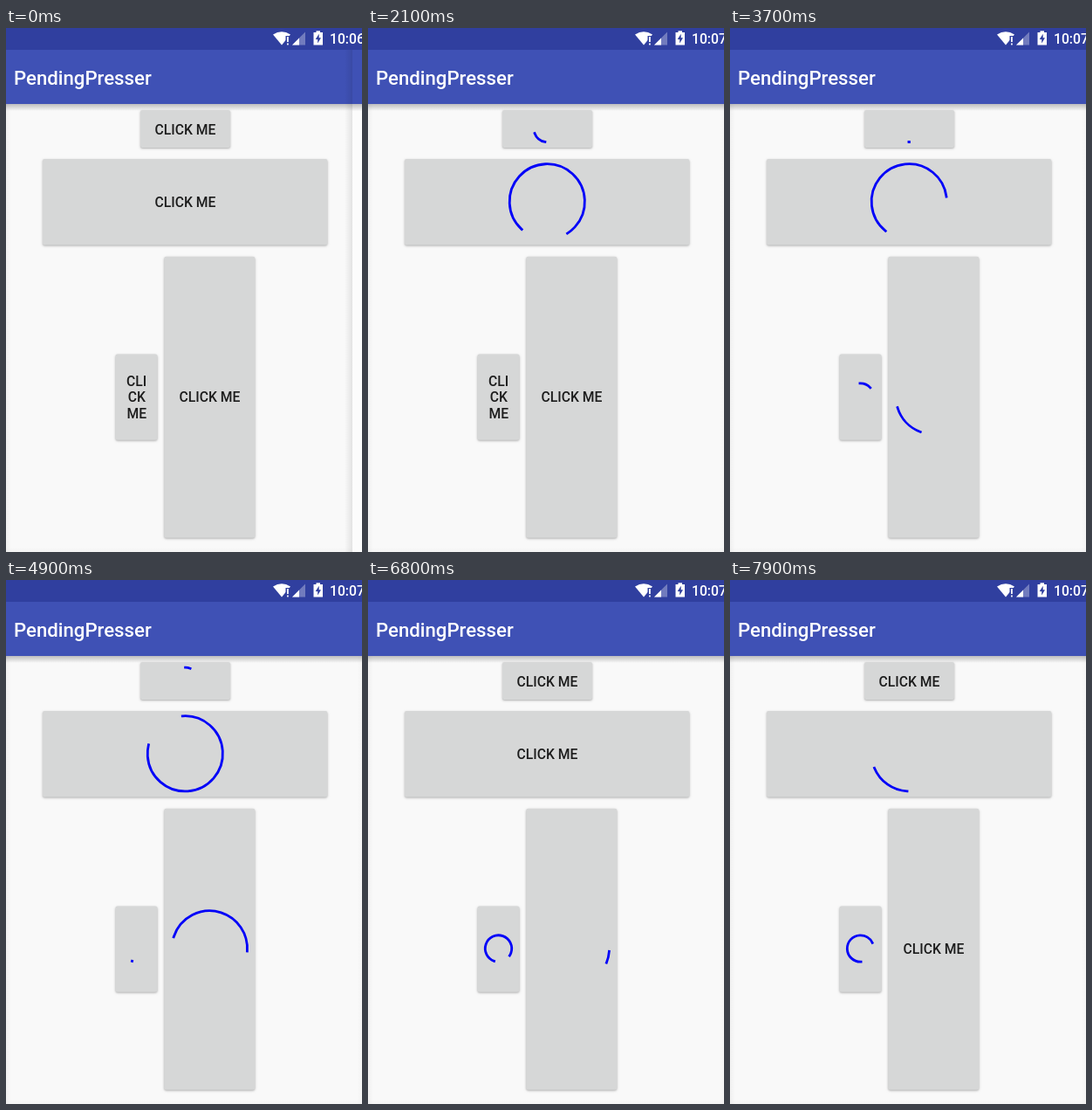
Animation of 408x600 px, one loop 8 s. Source, as an HTML page with a canvas:

```html
<!DOCTYPE html>
<html lang="en">
<head>
<meta charset="utf-8">
<title>Loading buttons</title>
<style>
  html, body { margin: 0; width: 100%; height: 100%; overflow: hidden; background: #f9f9f9; }
  canvas { display: block; width: 408px; height: 600px; }
</style>
</head>
<body>
<canvas id="stage" width="408" height="600"></canvas>
<script>
const ctx = document.getElementById('stage').getContext('2d');
const W = 408, H = 600;
const LOOP = 8000, STEP = 100;
const CYCLE = 1345, RUN = 5000;
const PRESS_LEAD = 80, PRESS_LIFE = 400;
const MAX_ARC = 288, TURN = 306;
const STROKE = 2.8;

const buttons = [
  { x: 154, y: 94, w: 103, h: 43, cx: 205.3, cy: 115.3, r: 15.2,
    lines: ['CLICK ME'], baseline: 121.5, starts: [1083] },
  { x: 42, y: 150, w: 326.3, h: 98.5, cx: 205.3, cy: 198.8, r: 43.1,
    lines: ['CLICK ME'], baseline: 205, starts: [1518, 6891] },
  { x: 125.5, y: 373.5, w: 48, h: 98.3, cx: 149.5, cy: 422, r: 15.2,
    lines: ['CLI', 'CK', 'ME'], baseline: 410, starts: [2206, 7514] },
  { x: 181.3, y: 261.7, w: 104, h: 322, cx: 233.3, cy: 422, r: 43.2,
    lines: ['CLICK ME'], baseline: 428, starts: [2667], touch: [8, -24] }
];

// cubic-bezier(0.4, 0, 0.2, 1)
function ease(x) {
  if (x <= 0) return 0;
  if (x >= 1) return 1;
  let lo = 0, hi = 1;
  for (let i = 0; i < 24; i++) {
    const u = (lo + hi) / 2, v = 1 - u;
    if (1.2 * u * v * v + 0.6 * u * u * v + u * u * u < x) lo = u; else hi = u;
  }
  return lo * lo * (3 - 2 * lo);
}

function fillRect(color, x, y, w, h) {
  ctx.fillStyle = color;
  ctx.fillRect(x, y, w, h);
}

function polygon(color, ...points) {
  ctx.beginPath();
  points.forEach(([x, y]) => ctx.lineTo(x, y));
  ctx.closePath();
  ctx.fillStyle = color;
  ctx.fill();
}

function label(text, x, y, size, color, align = 'left') {
  ctx.font = `500 ${size}px Roboto, sans-serif`;
  ctx.textAlign = align;
  ctx.fillStyle = color;
  ctx.fillText(text, x, y);
}

function shade(x0, y0, x1, y1, from, to, box) {
  const g = ctx.createLinearGradient(x0, y0, x1, y1);
  g.addColorStop(0, `rgba(0,0,0,${from})`);
  g.addColorStop(1, `rgba(0,0,0,${to})`);
  fillRect(g, ...box);
}

function roundRect({ x, y, w, h }) {
  ctx.beginPath();
  ctx.roundRect(x, y, w, h, 2.2);
}

function drawStatusIcons() {
  const white = '#fff', bar = '#303f9f';
  // Wi-Fi fan with a warning mark
  ctx.beginPath();
  ctx.moveTo(316, 19.5);
  ctx.lineTo(306, 7.5);
  ctx.quadraticCurveTo(316, 0.8, 326, 7.5);
  ctx.closePath();
  ctx.fillStyle = white;
  ctx.fill();
  fillRect(bar, 320.5, 9, 6, 12);
  fillRect(white, 322, 10, 1.8, 6);
  fillRect(white, 322, 17.5, 1.8, 1.9);
  // Signal
  polygon('rgba(255,255,255,0.32)', [328, 19.5], [343, 19.5], [343, 4.5]);
  polygon(white, [328, 19.5], [336, 19.5], [336, 11.5]);
  // Charging battery
  fillRect(white, 352.5, 5, 10.5, 14.5);
  fillRect(white, 355.5, 3.3, 4.5, 2);
  polygon(bar, [358.7, 6.8], [354.7, 13], [357.2, 13], [357.2, 17.5], [361, 11.3], [358.7, 11.3]);
}

function drawChrome(t) {
  fillRect('#f9f9f9', 0, 0, W, H);
  shade(0, 0, 6, 0, 0.035, 0, [0, 87, 6, H - 87]);
  shade(0, H - 6, 0, H, 0, 0.02, [0, H - 6, W, 6]);
  shade(0, 87, 0, 95, 0.24, 0, [0, 87, W, 8]);
  fillRect('#303f9f', 0, 0, W, 25);
  fillRect('#3f51b5', 0, 25, W, 62);
  if (t < 500) {
    fillRect('#fcfcfc', 397, 95, 11, H - 95);
    shade(388, 0, 397, 0, 0, 0.09, [388, 25, 9, H - 25]);
  } else {
    shade(W - 6, 0, W, 0, 0, 0.02, [W - 6, 87, 6, H - 87]);
  }
  drawStatusIcons();
  label(t < 500 ? '10:06' : '10:07', 371, 18, 15.7, '#fff');
  label('PendingPresser', 9, 65, 22.2, '#fff');
}

function drawRipple(b, p) {
  const [dx, dy] = b.touch || [0, 0];
  const fade = Math.min(1, (1 - p) / 0.4);
  ctx.save();
  roundRect(b);
  ctx.clip();
  fillRect(`rgba(0,0,0,${0.02 * fade})`, b.x, b.y, b.w, b.h);
  ctx.beginPath();
  ctx.arc(b.cx + dx, b.cy + dy, 1.08 * p * Math.hypot(b.w, b.h) / 2, 0, 2 * Math.PI);
  ctx.fillStyle = `rgba(0,0,0,${0.045 * fade})`;
  ctx.fill();
  ctx.restore();
}

function drawSpinner(b, elapsed) {
  const turns = elapsed / CYCLE, n = Math.floor(turns), f = turns - n;
  const base = turns * TURN + n * MAX_ARC;
  const tail = base + MAX_ARC * ease(2 * f - 1);
  const head = Math.max(base + MAX_ARC * ease(2 * f), tail + 0.5);
  const rad = Math.PI / 180, wrapped = tail % 360;
  ctx.beginPath();
  ctx.arc(b.cx, b.cy, b.r, wrapped * rad, (wrapped + head - tail) * rad);
  ctx.lineWidth = STROKE;
  ctx.lineCap = 'square';
  ctx.strokeStyle = '#0000f8';
  ctx.stroke();
}

function drawButton(b, t) {
  const start = b.starts.find(s => t >= s && t < s + RUN);
  const press = b.starts
    .map(s => (t - s + PRESS_LEAD) / PRESS_LIFE)
    .find(p => p >= 0 && p < 1);
  const pressed = press !== undefined;

  ctx.save();
  ctx.shadowColor = 'rgba(0,0,0,0.3)';
  ctx.shadowBlur = pressed ? 4 : 2.5;
  ctx.shadowOffsetY = 1;
  roundRect(b);
  ctx.fillStyle = '#d6d7d7';
  ctx.fill();
  ctx.restore();

  if (pressed) drawRipple(b, press);
  if (start !== undefined) {
    drawSpinner(b, t - start);
  } else {
    b.lines.forEach((line, i) =>
      label(line, b.cx + 0.2, b.baseline + i * 18.4, 15.7, 'rgba(0,0,0,0.87)', 'center'));
  }
}

function frame() {
  const t = Math.floor((performance.now() % LOOP) / STEP) * STEP;
  drawChrome(t);
  buttons.forEach(b => drawButton(b, t));
  requestAnimationFrame(frame);
}
frame();
</script>
</body>
</html>
```
